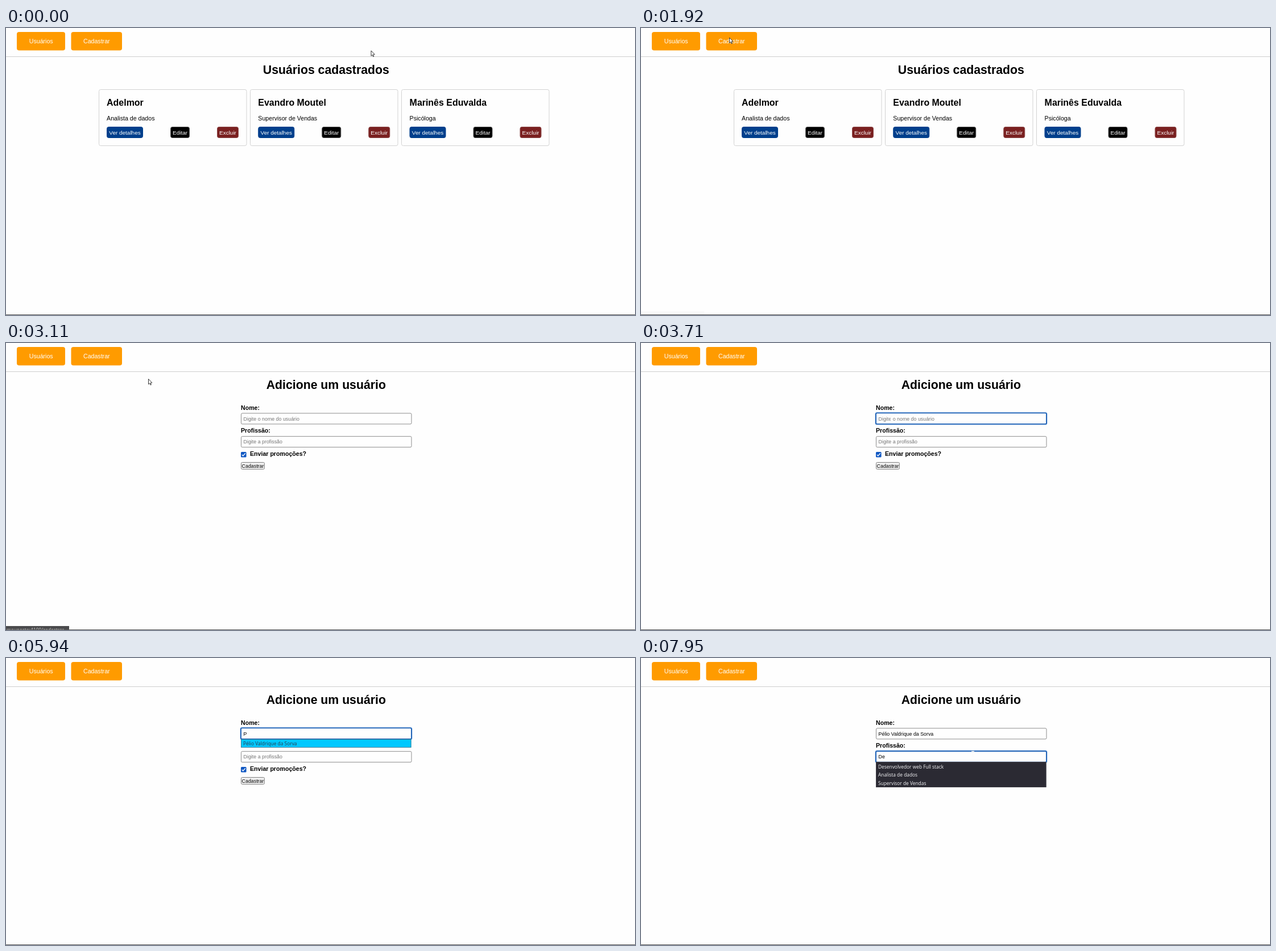
Write an HTML page with a canvas that moves like this. It is 1106 by 506 pixels and loops after 8 s.

```html
<!DOCTYPE html>
<html lang="pt-BR">
<head>
<meta charset="utf-8">
<title>Cadastro de usuários</title>
<style>
html, body { margin: 0; width: 100%; height: 100%; overflow: hidden; background: #fefefe; }
canvas { display: block; width: 1106px; height: 506px; }
</style>
</head>
<body>
<canvas id="stage" width="1106" height="506"></canvas>
<script>
const ctx = document.getElementById('stage').getContext('2d');
const LOOP = 8000, STEP = 1000 / 15;
const SANS = '"Liberation Sans", Arial, sans-serif';
const MENU = '"Open Sans", "Noto Sans", sans-serif';
const FULL_NAME = 'Pélio Valdrique da Sorva';
const JOBS = ['Desenvolvedor web Full stack', 'Analista de dados', 'Supervisor de Vendas'];
const CARDS = [
  ['Adelmor', JOBS[1]],
  ['Evandro Moutel', JOBS[2]],
  ['Marinês Eduvalda', 'Psicóloga']
];
// Pointer path: time, x, y
const PATH = [[0, 642, 40], [130, 632, 46], [400, 490, 118], [870, 302, 175],
  [1100, 265, 130], [1660, 155.5, 17], [2710, 155.5, 19], [2910, 181, 21],
  [3110, 250.5, 63.5]];

function text(str, x, y, size, color = '#000', o = {}) {
  ctx.font = `${o.bold ? 'bold ' : ''}${size}px ${o.font || SANS}`;
  ctx.textAlign = o.align || 'left';
  ctx.fillStyle = color;
  ctx.fillText(str, x, y);
  return ctx.measureText(str).width;
}

function rect(x, y, w, h, fill, color) {
  if (fill) { ctx.fillStyle = fill; ctx.fillRect(x, y, w, h); }
  if (color) { ctx.strokeStyle = color; ctx.lineWidth = 1; ctx.strokeRect(x, y, w, h); }
}

function box(x, y, w, h, r, fill, color, line = 1) {
  ctx.beginPath();
  ctx.roundRect(x, y, w, h, r);
  if (fill) { ctx.fillStyle = fill; ctx.fill(); }
  if (color) { ctx.strokeStyle = color; ctx.lineWidth = line; ctx.stroke(); }
}

function shape(points, x, y, fill) {
  ctx.beginPath();
  points.forEach(([px, py]) => ctx.lineTo(x + px, y + py));
  ctx.closePath();
  ctx.fillStyle = fill;
  ctx.fill();
  ctx.strokeStyle = '#222';
  ctx.lineWidth = 0.9;
  ctx.stroke();
}

function header() {
  rect(0, 0, 1106, 506, '#fefefe');
  rect(0, 50, 1106, 1, '#cfcfcf');
  box(19, 7, 85, 32.5, 4, '#ff9b00');
  box(114.5, 7, 89.5, 32.5, 4, '#ff9b00');
  text('Usuários', 61.7, 27, 10.62, '#fff', { align: 'center' });
  text('Cadastrar', 159.3, 27, 10.62, '#fff', { align: 'center' });
}

function heading(str) {
  text(str, 562.8, 81, 21.25, '#000', { bold: true, align: 'center' });
}

function tag(label, x, w, fill, border) {
  box(x + 0.5, 174.5, w - 1, 19, 3, fill, border);
  text(label, x + w / 2, 187.5, 9.96, '#fff', { align: 'center' });
}

function usersPage() {
  heading('Usuários cadastrados');
  CARDS.forEach(([name, job], i) => {
    const x = 163.5 + i * 266.25;
    box(Math.round(x) - 0.5, 108.5, 259.5, 99, 3, null, '#d2d2d2');
    text(name, x + 13.6, 137, 15.94, '#000', { bold: true });
    text(job, x + 13.6, 163, 10.62);
    tag('Ver detalhes', x + 13.5, 64, '#003f8c', '#003f8c');
    tag('Editar', x + 125.5, 34, '#000', '#555');
    tag('Excluir', x + 207.5, 38, '#7a2020', '#8d4a4a');
  });
}

function caret(x, y) {
  rect(x, y, 1, 10, '#000');
}

function field(y, focused, value, hint, caretOn) {
  if (focused) {
    box(411.3, y - 1.7, 303.4, 22.9, 3.5, '#c3dcf5');
    box(413, y, 300, 19.5, 2, '#fefefe', '#1c5fb4', 1.9);
  } else {
    box(413.5, y + 0.5, 299.5, 19, 2, '#fefefe', '#8c8c8c');
  }
  const w = text(value || hint, 417.6, y + 13.2, 8.85, value ? '#000' : '#757575');
  if (caretOn) caret(value ? Math.round(417.6 + w) : 417, y + 5);
}

function formPage(t) {
  const first = t >= 3710 && t < 7000, second = t >= 7000;
  const name = t < 5020 ? '' : t < 6270 ? 'P' : FULL_NAME;
  const job = t < 7530 ? '' : t < 7800 ? 'D' : 'De';
  const nameCaret = (t >= 3970 && t < 4490) || (t >= 5020 && t < 5610) || (t >= 6270 && t < 6670);
  const jobCaret = (t >= 7000 && t < 7270) || (t >= 7530 && t < 7800);
  const bold = { bold: true };

  heading('Adicione um usuário');
  text('Nome:', 413, 118, 10.62, '#000', bold);
  field(123.4, first, name, 'Digite o nome do usuário', nameCaret);
  text('Profissão:', 413, 158.3, 10.62, '#000', bold);
  field(164.2, second, job, 'Digite a profissão', jobCaret);

  box(413, 192, 9.6, 9.6, 1.5, '#1259c3');
  ctx.beginPath();
  ctx.moveTo(414.9, 197);
  ctx.lineTo(416.9, 199);
  ctx.lineTo(420.8, 194.4);
  ctx.strokeStyle = '#fff';
  ctx.lineWidth = 1.4;
  ctx.stroke();
  text('Enviar promoções?', 429, 199, 10.62, '#000', bold);

  box(413.5, 210.5, 41, 12, 2, '#efefef', '#808080');
  text('Cadastrar', 434, 219.5, 8.85, '#000', { align: 'center' });

  if (t >= 5350 && t < 6270) menu(143, [FULL_NAME], t >= 5940);
  if (t >= 7660) menu(183.5, JOBS, false);
  beam(t);
}

function menu(y, items, active) {
  const h = items.length * 14.7;
  rect(413, y, 299.5, h, active ? '#00c8ff' : '#2b2a33');
  rect(413.5, Math.floor(y) + 0.5, 298.5, Math.floor(h), null, active ? '#3a7f98' : '#3f3e46');
  items.forEach((item, i) =>
    text(item, 417, y + 11.2 + i * 14.7, 8.4, active ? '#2b3a48' : '#f6f6f8', { font: MENU }));
}

// The text pointer is white, so it only shows where it crosses something
function beam(t) {
  if (t < 3310 || (t >= 5020 && t < 7000)) return;
  const [x, y] = t >= 7000 ? [583, 164] : t < 3710 ? [431, 129] : [439, 129];
  rect(x - 2, y, 5, 1, '#f4f4f0');
  rect(x, y, 1, 10, '#fafafa');
}

function pointer(t) {
  if (t >= 3310) return;
  const q = t >= 2910 ? t : Math.floor((t + 5) / STEP) * STEP;
  let i = 0;
  while (i < PATH.length - 2 && q >= PATH[i + 1][0]) i++;
  const a = PATH[i], b = PATH[i + 1];
  let k = Math.min(1, (q - a[0]) / (b[0] - a[0]));
  if (t < 130 || (t >= 1660 && t < 3110)) k = 0;
  const x = a[1] + (b[1] - a[1]) * k, y = a[2] + (b[2] - a[2]) * k;
  if (t >= 2510 && t < 3110) {
    shape([[0, 0], [1.6, 0], [1.8, 4], [6.5, 5], [7, 9], [5.6, 12], [0.6, 12],
      [-3, 7.5], [-2, 6.5], [0, 8]], x + 1, y + 1, '#fff');
  } else {
    shape([[0, 0], [0, 9.3], [2.1, 7.4], [3.6, 10.6], [4.9, 10], [3.5, 6.9], [6.3, 6.6]],
      x, y, '#fff');
  }
}

function statusBar(t) {
  const alpha = t < 1660 ? 0 : t < 2710 ? 0.02 : t < 3310 ? 1 : t < 3510 ? 0.5 : t < 3710 ? 0.12 : 0;
  if (!alpha) return;
  ctx.globalAlpha = alpha;
  rect(0, 499, 111, 7, '#4b4b4d');
  text('meuposto:4100/cadastrar', 1, 509, 8.4, '#d0d0d0', { font: MENU });
  ctx.globalAlpha = 1;
}

function draw(now) {
  const t = now % LOOP;
  header();
  if (t < 3110) usersPage(); else formPage(t);
  statusBar(t);
  rect(0, 505, 1106, 1, '#5a5a5a');
  pointer(t);
}

const start = performance.now();
function tick() {
  draw(performance.now() - start);
  requestAnimationFrame(tick);
}
tick();
</script>
</body>
</html>
```
